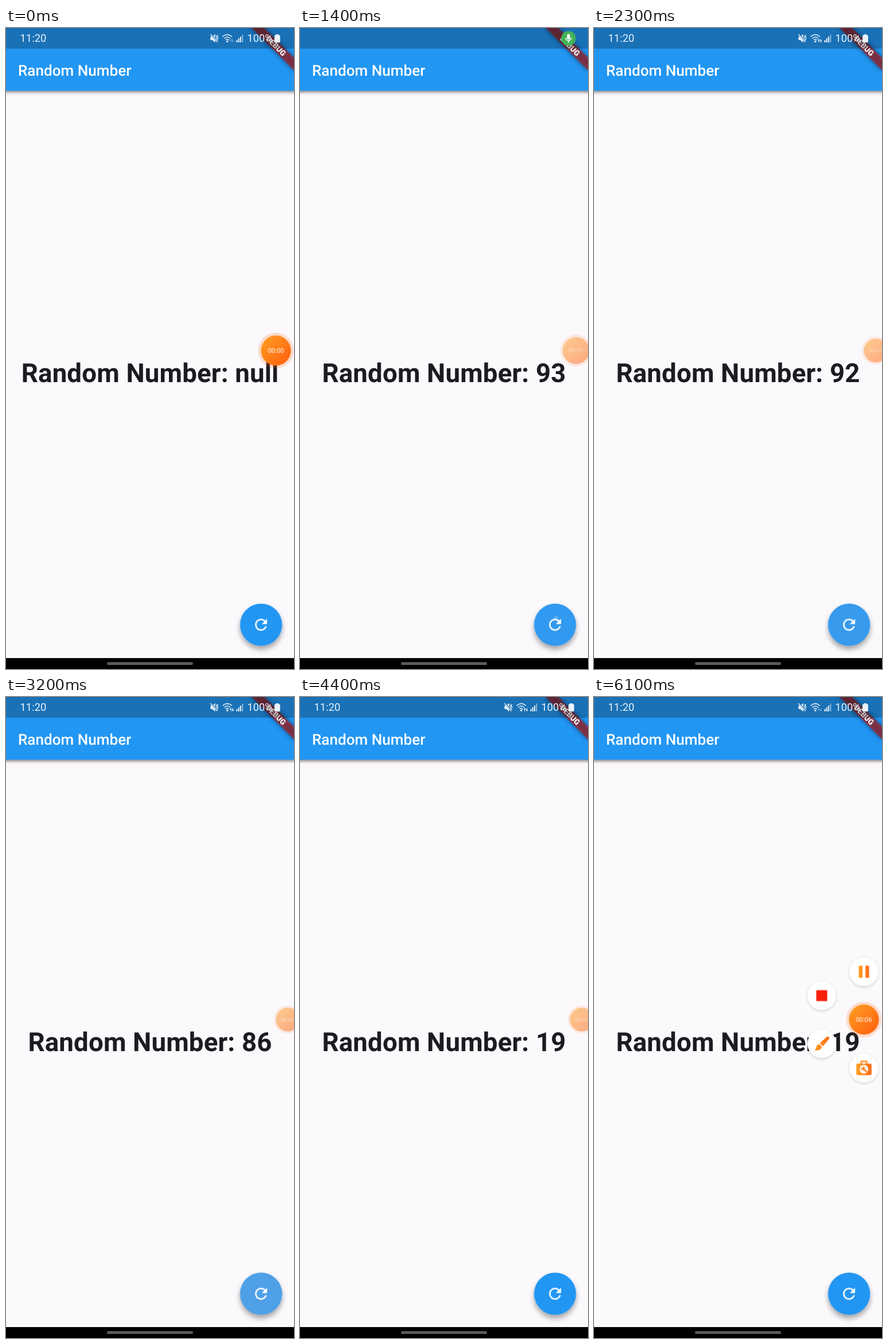
Write an HTML page that moves like this. It is 502 px wide and 1115 px high and loops after 6200 ms.

```html
<!DOCTYPE html>
<html lang="en">
<head>
<meta charset="utf-8">
<title>Random Number</title>
<style>
html, body { margin: 0; width: 100%; height: 100%; overflow: hidden; background: #fbf9fc; }
body { position: relative; font-family: Roboto, sans-serif; text-rendering: geometricPrecision; }
svg { position: absolute; left: 0; top: 0; }
svg *, .strip { animation-duration: 6200ms; animation-iteration-count: infinite; animation-timing-function: linear; }

.window { position: absolute; left: 0; top: 570px; width: 502px; height: 64px; overflow: hidden; }
.strip { animation-name: number; animation-timing-function: step-end; }
.strip div { height: 64px; font: 700 45.6px/64px Roboto, sans-serif; letter-spacing: .18px; text-align: center; white-space: nowrap; color: #1d1b20; }
@keyframes number {
  0% { transform: translateY(0); }
  9.68% { transform: translateY(-64px); }
  30.65% { transform: translateY(-128px); }
  46.77% { transform: translateY(-192px); }
  56.45% { transform: translateY(-256px); }
  66.13%, 100% { transform: translateY(-320px); }
}

#seconds { animation-name: seconds; animation-timing-function: step-end; }
@keyframes seconds {
  0% { transform: translateY(0); }
  17.74% { transform: translateY(-20px); }
  33.87% { transform: translateY(-40px); }
  50% { transform: translateY(-60px); }
  66.13% { transform: translateY(-80px); }
  82.26% { transform: translateY(-100px); }
  98.39%, 100% { transform: translateY(-120px); }
}

#status { animation-name: status; }
@keyframes status {
  0%, 4.84% { opacity: 1; }
  8.06%, 30.65% { opacity: 0; }
  34.68%, 100% { opacity: 1; }
}
#traffic { animation-name: traffic; animation-timing-function: step-end; }
@keyframes traffic {
  0% { opacity: .4; }
  30% { opacity: 1; }
  98.39%, 100% { opacity: .4; }
}
#chip { animation-name: chip; }
@keyframes chip {
  0%, 6.45% { transform: translate(468px, 18px) scale(0); }
  10.5%, 25.81% { transform: translate(468px, 18px) scale(1); }
  29.84%, 100% { transform: translate(468px, 18px) scale(0); }
}

#bubble { animation-name: dock; }
@keyframes dock {
  0%, 20.16% { transform: translate(470.5px, 561px) scale(1); }
  22.58% { transform: translate(481px, 561px) scale(.9); }
  25%, 75.81% { transform: translate(491px, 561px) scale(.79); }
  77.9%, 100% { transform: translate(470.5px, 561px) scale(1); }
}
.fade { animation-name: fade; }
@keyframes fade {
  0%, 17.74% { opacity: 1; }
  20.97%, 75.81% { opacity: .52; }
  77.9%, 100% { opacity: 1; }
}
.tool { animation-name: open; }
@keyframes open {
  0%, 77% { transform: translate(470.5px, 561px) scale(.4); visibility: hidden; animation-timing-function: cubic-bezier(.2, .6, .4, 1); }
  77.01% { visibility: visible; }
  82.26%, 100% { transform: translate(var(--x), var(--y)) scale(1); visibility: visible; }
}

#press { animation-name: press; }
@keyframes press {
  0%, 4% { opacity: 0; }
  8.06% { opacity: .26; }
  12.9%, 15% { opacity: 0; }
  18.5% { opacity: .25; }
  21.8% { opacity: .07; }
  22.58% { opacity: .09; }
  26% { opacity: .28; }
  30.65% { opacity: .06; }
  34% { opacity: .27; }
  37.1% { opacity: .12; }
  39.5% { opacity: .05; }
  43.5% { opacity: .28; }
  47.5% { opacity: .08; }
  51.61% { opacity: .27; }
  55.5% { opacity: .08; }
  59.68% { opacity: .3; }
  62.5% { opacity: .07; }
  65.5% { opacity: .28; }
  70.97%, 100% { opacity: 0; }
}
#touch { animation-name: touch; }
@keyframes touch {
  0%, 21.5% { opacity: 0; }
  22.58% { opacity: .4; }
  24.5%, 100% { opacity: 0; }
}
</style>
</head>
<body>
<div class="window"><div class="strip">
  <div>Random Number: null</div>
  <div>Random Number: 93</div>
  <div>Random Number: 92</div>
  <div>Random Number: 86</div>
  <div>Random Number: 70</div>
  <div>Random Number: 19</div>
</div></div>

<svg width="502" height="1115" viewBox="0 0 502 1115" font-family="Roboto, sans-serif">
  <defs>
    <linearGradient id="orange" x1="0" y1="0" x2="1" y2="1">
      <stop offset=".1" stop-color="#ff9a22"/><stop offset=".9" stop-color="#ff6310"/>
    </linearGradient>
    <linearGradient id="warm" x1="0" y1="0" x2="1" y2="0">
      <stop offset="0" stop-color="#ffa022"/><stop offset="1" stop-color="#ff6a18"/>
    </linearGradient>
    <filter id="barShade" x="-5%" y="-20%" width="110%" height="150%">
      <feDropShadow dx="0" dy="3" stdDeviation="2.5" flood-opacity=".45"/>
    </filter>
    <filter id="fabShade" x="-40%" y="-40%" width="180%" height="180%">
      <feDropShadow dx="0" dy="6" stdDeviation="5" flood-opacity=".35"/>
    </filter>
    <filter id="toolShade" x="-30%" y="-30%" width="160%" height="160%">
      <feDropShadow dx="0" dy="1.5" stdDeviation="2" flood-opacity=".2"/>
    </filter>
    <filter id="soft" x="-20%" y="-150%" width="140%" height="400%">
      <feGaussianBlur stdDeviation="4.5"/>
    </filter>
    <clipPath id="digits"><rect x="-20" y="-10" width="40" height="20"/></clipPath>
  </defs>

  <!-- app bar -->
  <rect x="-10" y="-10" width="522" height="119" fill="#2196f3" filter="url(#barShade)"/>
  <text x="21" y="82.5" font-size="26.1" font-weight="500" fill="#fff">Random Number</text>
  <g transform="translate(502 0) rotate(45)">
    <rect x="-53" y="36.5" width="106" height="15.7" opacity=".5" filter="url(#soft)"/>
    <rect x="-53" y="36.5" width="106" height="15.7" fill="#b71c1c" fill-opacity=".63"/>
    <text y="49" font-size="13.3" font-weight="900" fill="#fff" text-anchor="middle">DEBUG</text>
  </g>
  <rect width="502" height="36" fill="#000" opacity=".25"/>

  <!-- status bar -->
  <g id="status" fill="#eaf3fb">
    <text x="24.5" y="24.3" font-size="18.4">11:20</text>
    <text x="420.5" y="24.3" font-size="18.2">100%</text>
    <path d="M356.5 15h3.2l4.8-4.5v15l-4.8-4.5h-3.2z"/>
    <path d="M366 13l1.8 2.4-1.8 2.4 1.8 2.4-1.8 2.6M369.3 12l-1 2.8 1.4 3-1.4 3 1 3" fill="none" stroke="#eaf3fb" stroke-width="1.2"/>
    <path d="M357 11l12 13.5" stroke="#1b70b6" stroke-width="3"/>
    <path d="M356.5 11l12 13.5" stroke="#eaf3fb" stroke-width="1.5"/>
    <g fill="none" stroke="#eaf3fb" stroke-width="1.4">
      <path d="M377.5 15.2q8.2-7.2 16.4 0M380.2 18.2q5.5-4.8 11 0M382.8 21q2.9-2.5 5.8 0"/>
    </g>
    <circle cx="385.7" cy="23.4" r="1.7"/>
    <path id="traffic" d="M391.8 19l2 2.6h-1.3v3h-1.4v-3h-1.3zM395.4 25l-2-2.6h1.3v-3h1.4v3h1.3z"/>
    <path d="M401.5 21h2v4h-2zM404.7 18h2v7h-2zM407.9 15h2v10h-2z"/>
    <path d="M411.3 11.5h2V25h-2z" opacity=".55"/>
    <path d="M470.5 11h4.8v1.6h1.3q1.2 0 1.2 1.2v10q0 1.4-1.4 1.4h-7q-1.4 0-1.4-1.4v-10q0-1.2 1.2-1.2h1.3z"/>
  </g>
  <g id="chip">
    <circle r="12.7" fill="#43b258"/>
    <rect x="-2.6" y="-7.5" width="5.2" height="9.6" rx="2.6" fill="#fff"/>
    <path d="M-5-1a5 5 0 0 0 10 0M0 4v3.6" fill="none" stroke="#fff" stroke-width="1.5"/>
  </g>

  <!-- refresh button -->
  <g transform="translate(444.6 1038)">
    <circle r="36.7" fill="#2196f3" filter="url(#fabShade)"/>
    <circle id="press" r="36.7" fill="#cfbcc6"/>
    <circle id="touch" cx="2" cy="-11" r="4" fill="#9bd0fa"/>
    <path transform="scale(1.304) translate(-12 -12)" fill="#fff" d="M17.65 6.35C16.2 4.9 14.21 4 12 4c-4.42 0-7.99 3.58-7.99 8s3.57 8 7.99 8c3.73 0 6.84-2.55 7.73-6h-2.08c-.82 2.33-3.04 4-5.65 4-3.31 0-6-2.69-6-6s2.69-6 6-6c1.66 0 3.14.69 4.22 1.78L13 11h7V4z"/>
  </g>

  <!-- recorder tools -->
  <g class="tool" style="--x:470.5px;--y:478px">
    <circle r="25" fill="#fff" filter="url(#toolShade)"/>
    <path d="M-9-10.5h6.5v21H-9zM2.5-10.5H9v21H2.5z" fill="url(#warm)"/>
  </g>
  <g class="tool" style="--x:397px;--y:519.5px">
    <circle r="25" fill="#fff" filter="url(#toolShade)"/>
    <rect x="-9.5" y="-9.5" width="19" height="19" rx="1" fill="#f8200e"/>
  </g>
  <g class="tool" style="--x:397px;--y:603px">
    <circle r="25" fill="#fff" filter="url(#toolShade)"/>
    <path d="M-3.5-1L9-12q2-1.2 3.5.3t.3 3.4L2 4.5zM-5.2 1.2q4 .8 5.2 5Q-2.5 13-13 11.5q3.3-2 3.5-5.5.5-4.5 4.3-4.8z" fill="url(#warm)"/>
  </g>
  <g class="tool" style="--x:470.5px;--y:645.5px">
    <circle r="25" fill="#fff" filter="url(#toolShade)"/>
    <path d="M-5-7v-3.5q0-1.3 1.3-1.3h7.4q1.3 0 1.3 1.3V-7" fill="none" stroke="#ff8a1e" stroke-width="2.6"/>
    <rect x="-13.3" y="-7.8" width="26.6" height="20" rx="2.2" fill="url(#warm)"/>
    <circle cy="2" r="7.4" fill="#fff"/>
    <path d="M-1 1L4 6" stroke="#ff7f1c" stroke-width="2.8" stroke-linecap="round"/>
    <circle cx="-1.6" cy=".4" r="3.2" fill="#ff7f1c"/>
    <path d="M-2-.2L-5.5-3.5" stroke="#fff" stroke-width="2"/>
  </g>

  <!-- recorder bubble -->
  <g id="bubble">
    <g class="fade">
      <circle r="28.6" fill="none" stroke="#ff6a20" stroke-width="4.8" opacity=".2"/>
      <circle r="26.2" fill="url(#orange)"/>
      <g class="fade" clip-path="url(#digits)">
        <g id="seconds" font-size="11.2" fill="#fff" text-anchor="middle">
          <text y="4">00:00</text><text y="24">00:01</text><text y="44">00:02</text><text y="64">00:03</text>
          <text y="84">00:04</text><text y="104">00:05</text><text y="124">00:06</text>
        </g>
      </g>
    </g>
  </g>

  <!-- navigation bar -->
  <rect y="1096" width="502" height="19" fill="#000"/>
  <rect x="176" y="1103" width="150" height="5" rx="2.5" fill="#5a5a5a"/>
</svg>
</body>
</html>
```
